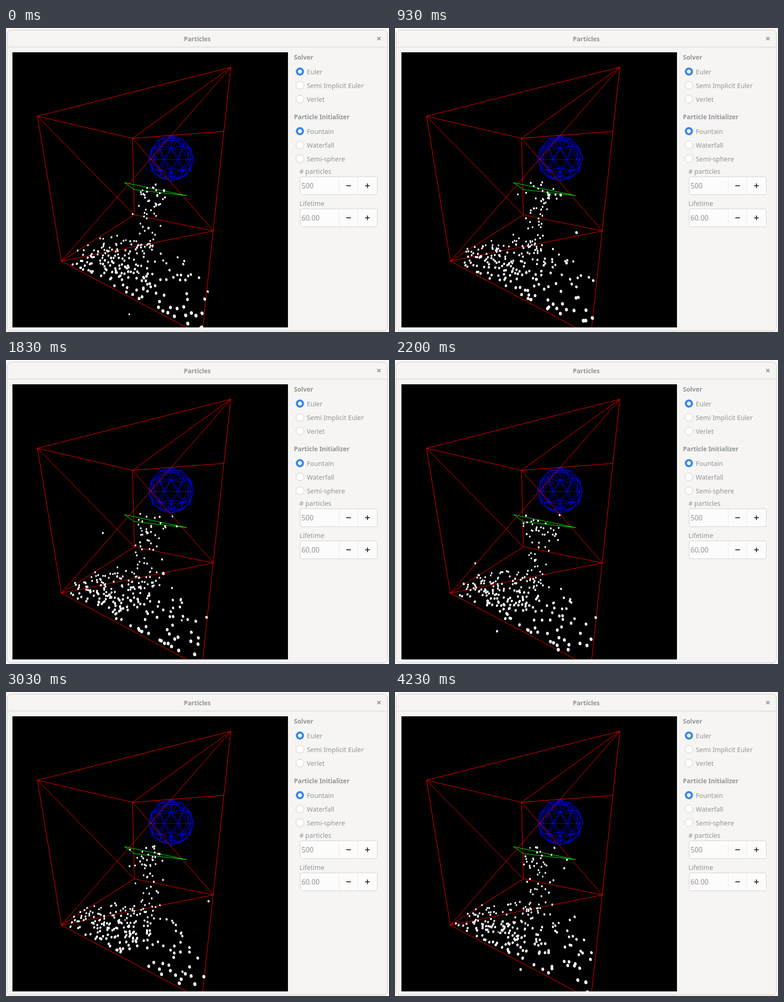
Write an HTML page with a canvas that moves like this. It is 834 px wide and 663 px high and loops after 4.26 s.

```html
<!DOCTYPE html>
<html lang="en">
<head>
<meta charset="utf-8">
<title>Particles</title>
<style>
  html, body { margin: 0; width: 100%; height: 100%; overflow: hidden; background: #fafafa; }
  svg, canvas { position: absolute; left: 0; top: 0; display: block; }
  canvas { left: 14px; top: 53px; background: #000; }
  text { font: 14.2px "Noto Sans", "Open Sans", sans-serif; fill: #929595; }
  .b { font-weight: 700; font-size: 13.55px; }
  .n { font-size: 15.4px; }
  .dark { stroke: #2e3436; stroke-width: 2; fill: none; }
</style>
</head>
<body>
<svg id="ui" width="834" height="663">
  <rect x="2.5" y="4.5" width="828" height="656" rx="8" fill="#f6f5f4" stroke="#c8c4c0"/>
  <path d="M3 41.5H830" stroke="#d5d0cc"/>
  <text class="b" x="416.5" y="28.5" text-anchor="middle">Particles</text>
  <path d="M808.5 19.5l7 7m0-7l-7 7" stroke="#929595" stroke-width="2"/>
  <text class="b" x="627" y="69">Solver</text>
  <text class="b" x="627" y="199">Particle Initializer</text>
  <text x="639" y="318"># particles</text>
  <text x="639" y="388">Lifetime</text>
</svg>
<canvas id="view" width="600" height="600"></canvas>
<script>
const ui = document.getElementById('ui');
const ctx = document.getElementById('view').getContext('2d');
const add = s => ui.insertAdjacentHTML('beforeend', s);

function radio(y, label, on) {
  add(on
    ? `<circle cx="640" cy="${y}" r="9" fill="#3f88e5"/><circle cx="640" cy="${y}" r="4.2" fill="#fff"/>`
    : `<circle cx="640" cy="${y}" r="8.6" fill="#fff" stroke="#cdc7c2"/>`);
  add(`<text x="655" y="${y + 6}">${label}</text>`);
}

function spin(y, value) {
  add(`<rect x="640.5" y="${y + .5}" width="168" height="39" rx="4" fill="#fcfcfc" stroke="#d2cdc8"/>
    <path d="M725.5 ${y + 1}v38M766.5 ${y + 1}v38" stroke="#ebe8e5"/>
    <text class="n" x="643.5" y="${y + 26}">${value}</text>
    <path class="dark" d="M741 ${y + 20}h10M782 ${y + 20}h10m-5 -5v10"/>`);
}

radio(95, 'Euler', true);
radio(125, 'Semi Implicit Euler');
radio(155, 'Verlet');
radio(225, 'Fountain', true);
radio(255, 'Waterfall');
radio(285, 'Semi-sphere');
spin(324, '500');
spin(394, '60.00');

// Wireframe scene, in stage coordinates
const A = [68, 192], B = [489, 85], C = [275, 240], D = [474, 225];
const E = [279, 407], F = [451, 442], G = [120, 508], H = [426, 670];
const boxEdges = [[A, B], [A, C], [B, C], [B, G], [B, H], [C, D], [C, E],
  [C, F], [E, F], [E, G], [F, G], [A, G], [A, E], [G, H]];
const P1 = [258, 337], P2 = [393, 365], P3 = [279, 352];
const plateEdges = [[P1, P2], [P2, P3], [P3, P1]];

function ballEdges() {
  const ring = (y, off) => [0, 1, 2, 3, 4].map(k => {
    const a = off + k * Math.PI * 2 / 5, r = 2 / Math.sqrt(5);
    return [r * Math.sin(a), y, r * Math.cos(a)];
  });
  const y = 1 / Math.sqrt(5);
  const up = ring(y, 0), low = ring(-y, Math.PI / 5), faces = [];
  for (let k = 0; k < 5; k++) {
    const n = (k + 1) % 5;
    faces.push([[0, 1, 0], up[k], up[n]], [[0, -1, 0], low[k], low[n]],
      [up[k], up[n], low[k]], [low[k], low[n], up[n]]);
  }
  const mid = (p, q) => {
    const m = p.map((c, i) => c + q[i]), len = Math.hypot(...m);
    return m.map(c => c / len);
  };
  const flat = ([x, y, z]) => {
    const k = 49 / (1 - .12 * z);
    return [359 + x * k, 286 - y * (1 + .045 * y) * k];
  };
  const edges = new Map();
  const put = (p, q) => {
    const key = [p, q].map(v => v.map(c => Math.round(c * 100) + 0).join()).sort().join('|');
    edges.set(key, [flat(p), flat(q)]);
  };
  for (const [p, q, r] of faces) {
    const pq = mid(p, q), qr = mid(q, r), rp = mid(r, p);
    [[p, pq], [pq, q], [q, qr], [qr, r], [r, rp], [rp, p],
      [pq, qr], [qr, rp], [rp, pq]].forEach(e => put(...e));
  }
  return [...edges.values()];
}

// Crisp one-pixel lines without smoothing
function pixelPath(edges) {
  const path = new Path2D();
  for (const [[x0, y0], [x1, y1]] of edges) {
    const n = Math.ceil(Math.max(Math.abs(x1 - x0), Math.abs(y1 - y0)));
    for (let i = 0; i <= n; i++) {
      path.rect(Math.round(x0 + (x1 - x0) * i / n), Math.round(y0 + (y1 - y0) * i / n), 1, 1);
    }
  }
  return path;
}

const wires = document.createElement('canvas');
wires.width = wires.height = 600;
const wireCtx = wires.getContext('2d');
wireCtx.fillRect(0, 0, 600, 600);
wireCtx.translate(-14, -53);
for (const [edges, color] of [[ballEdges(), '#00f'], [boxEdges, '#f00'], [plateEdges, '#0f0']]) {
  wireCtx.fillStyle = color;
  wireCtx.fill(pixelPath(edges));
}

// Unit box coordinates: u along the back wall, v toward the viewer, h upward
function project(u, v, h) {
  const w = 1 - .2324 * u - .4569 * v - .1172 * h;
  return {
    x: (279 + 67.2 * u - 213.8 * v - 36.2 * h) / w,
    y: (407 - 67.7 * u - 131.1 * v - 195.1 * h) / w,
    w
  };
}

function rng(seed) {
  let s = Math.imul(seed + 1, 0x9E3779B1);
  return () => {
    s = s + 0x6D2B79F5 | 0;
    let r = Math.imul(s ^ s >>> 15, 1 | s);
    r = r + Math.imul(r ^ r >>> 7, 61 | r) ^ r;
    return ((r ^ r >>> 14) >>> 0) / 4294967296;
  };
}

const COUNT = 265, LIFE = 4, FALL = .75;
const LOOP = 4260, STEPS = 128;
const clamp = (x, lo, hi) => Math.max(lo, Math.min(hi, x));

function restPlace(rand, bell) {
  const pick = rand();
  let u, v;
  if (pick < .36) {
    u = .46 + .13 * bell();
    v = .89 + .07 * bell();
  } else if (pick < .5) {
    u = .13 + .08 * bell();
    v = .84 + .09 * bell();
  } else {
    u = .1 + .95 * rand();
    v = .55 + .47 * Math.sqrt(rand());
  }
  return [clamp(u, .01, 1), clamp(v, .4, .985)];
}

function place(i, time) {
  const clock = time + i * LIFE / COUNT;
  const turn = Math.floor(clock / LIFE), age = clock - turn * LIFE;
  const rand = rng(i + turn * COUNT);
  const bell = () => (rand() + rand() + rand() - 1.5) * 2;

  if (rand() < .08) {
    const du = (rand() - .5) * .8, dv = rand() * .4 - .03;
    return project(.5 + du * age, .5 + dv * age, .5 + .35 * age - .45 * age * age);
  }

  const su = .09 * bell(), sv = .07 * bell(), top = .48 + .025 * bell();
  const k = Math.min(age / FALL, 1);
  const u0 = .5 + su * (1 - .5 * k), v0 = .5 + sv * (1 - .5 * k) + .06 * k * k;
  if (k < 1) return project(u0, v0, top * (1 - k * k));

  const [u1, v1] = restPlace(rand, bell);
  const rate = 4 + 2 * rand(), lift = .05 + .13 * rand();
  const a = age - FALL, s = 1 - Math.exp(-2.5 * a);
  const hop = lift * Math.exp(-a * .9) * Math.abs(Math.sin(a * rate));
  return project(u0 + (u1 - u0) * s, v0 + (v1 - v0) * s, hop);
}

function draw(time) {
  ctx.setTransform(1, 0, 0, 1, 0, 0);
  ctx.drawImage(wires, 0, 0);
  ctx.translate(-14, -53);
  ctx.fillStyle = '#fff';
  for (let i = 0; i < COUNT; i++) {
    const p = place(i, time);
    if (p.w < .2) continue;
    const r = 1.32 / p.w;
    ctx.beginPath();
    ctx.ellipse(p.x, p.y, r * .86, r * 1.04, (314 - p.x) / 400, 0, Math.PI * 2);
    ctx.fill();
  }
}

const start = performance.now();
function tick() {
  const t = (performance.now() - start) % LOOP;
  draw(Math.floor(t * STEPS / LOOP) * LOOP / STEPS / 1000);
  requestAnimationFrame(tick);
}
tick();
</script>
</body>
</html>
```
